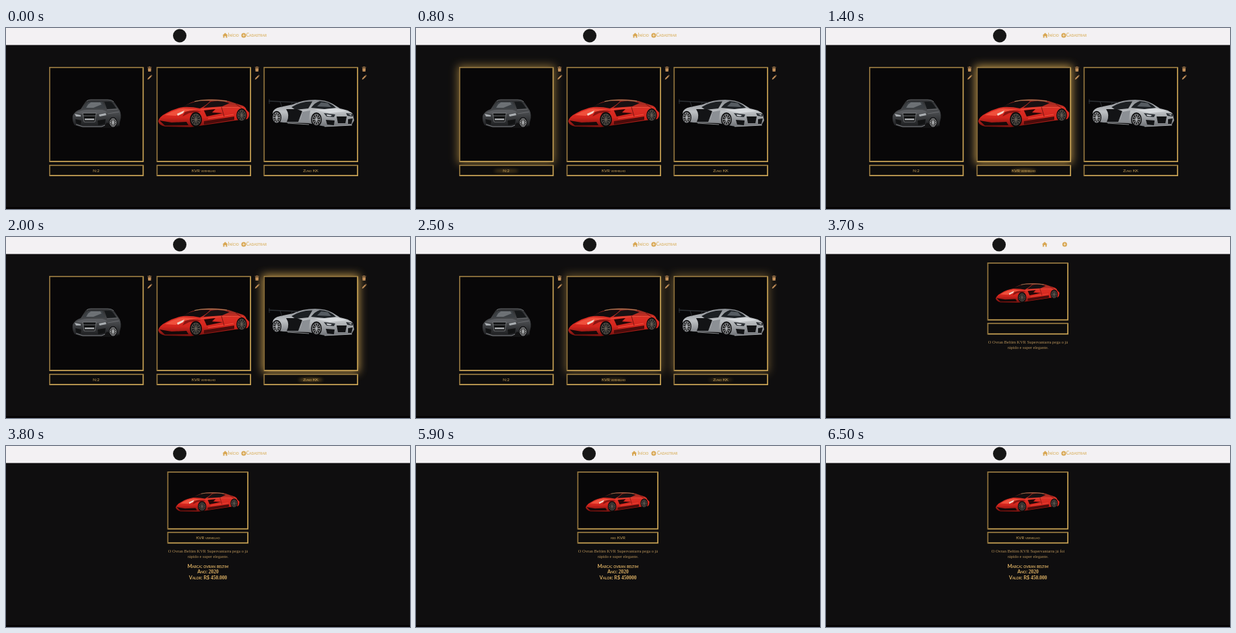
Animation of 600x270 px, one loop 7.7 s. Source, as an HTML page:

```html
<!DOCTYPE html>
<html lang="pt">
<head>
<meta charset="utf-8">
<title>Carros</title>
<style>
  html, body { margin: 0; width: 100%; height: 100%; overflow: hidden; background: #0f0e0f; }
  svg { display: block; width: 600px; height: 270px; }
  .caps { font-family: Lato, sans-serif; font-variant: small-caps; fill: #d0a85e; }
  .mid { text-anchor: middle; }
  .title { font-size: 6.2px; }
  .nav { font-size: 6.5px; font-weight: 700; fill: #dcb870; }
  .desc { font: 6.4px "Liberation Serif", serif; fill: #b8935a; }
  .spec { font-size: 7.2px; font-weight: 700; fill: #dcb064; }
  .num { font: 700 7.5px "Liberation Serif", serif; }
</style>
</head>
<body>
<svg id="stage" viewBox="0 0 600 270">
  <defs>
    <filter id="blur" x="-30%" y="-30%" width="160%" height="160%"><feGaussianBlur stdDeviation="6.5"/></filter>
    <filter id="soft" x="-50%" y="-100%" width="200%" height="300%"><feGaussianBlur stdDeviation="2"/></filter>
    <linearGradient id="red" x1="0" y1="0" x2="0" y2="1">
      <stop offset="0" stop-color="#7d2a20"/><stop offset=".35" stop-color="#dc2f25"/>
      <stop offset=".65" stop-color="#d3251d"/><stop offset="1" stop-color="#6e100e"/>
    </linearGradient>
    <linearGradient id="silver" x1="0" y1="0" x2="0" y2="1">
      <stop offset="0" stop-color="#85898e"/><stop offset=".45" stop-color="#bfc2c5"/><stop offset="1" stop-color="#707378"/>
    </linearGradient>
    <linearGradient id="grey" x1="0" y1="0" x2="0" y2="1">
      <stop offset="0" stop-color="#2b2c2e"/><stop offset=".45" stop-color="#4b4d50"/><stop offset="1" stop-color="#1b1c1e"/>
    </linearGradient>
  </defs>
  <rect width="600" height="270" fill="#0f0e0f"/>
  <rect y="267" width="600" height="3" fill="#060405"/>
  <rect width="600" height="25.4" fill="#f3f1f3"/>
  <g id="nav"></g>
  <g id="list"></g>
  <g id="detail"></g>
</svg>
<script>
const LOOP = 7700;
const $ = id => document.getElementById(id);
const path = (fill, d) => `<path fill="${fill}" d="${d}"/>`;
const line = (color, width, d) => `<path fill="none" stroke="${color}" stroke-width="${width}" d="${d}"/>`;
const text = (cls, x, y, s) => `<text class="${cls}" x="${x}" y="${y}">${s}</text>`;
const num = s => `<tspan class="num">${s}</tspan>`;

// Inset gold border
function frame(x, y, w, h, fill) {
  const b = 1.7;
  return `<rect x="${x}" y="${y}" width="${w}" height="${h}" fill="${fill}"/>` +
    path('#93763f', `M${x} ${y + h}V${y}H${x + w}l${-b} ${b}H${x + b}V${y + h - b}z`) +
    path('#c9a355', `M${x} ${y + h}H${x + w}V${y}l${-b} ${b}V${y + h - b}H${x + b}z`);
}

function wheel(x, y, rx, ry, rim) {
  let spokes = '';
  for (let i = 0; i < 10; i++) {
    const a = i * Math.PI / 5;
    spokes += `M${x} ${y}l${(rx * .7 * Math.cos(a)).toFixed(2)} ${(ry * .7 * Math.sin(a)).toFixed(2)}`;
  }
  return `<ellipse cx="${x}" cy="${y}" rx="${rx}" ry="${ry}" fill="#0b0b0c"/>` +
    `<ellipse cx="${x}" cy="${y}" rx="${rx * .76}" ry="${ry * .76}" fill="#222" stroke="${rim}" stroke-width=".8"/>` +
    line(rim, .9, spokes);
}

const suv =
  path('#131314', 'M101 144L112 149H160L169 146V138H100z') +
  path('url(#grey)', 'M99 131Q102 124 111 121L118 110Q120 107 125 107H151Q158 107 161 111L167 120Q171 125 170.5 134L168 145L160 147L150 141L144 148H113L102 145Q98 139 99 131z') +
  path('#3c4044', 'M114 120L120 112Q122 110 126 110H143L147 120z') +
  path('#6d7175', 'M122 114L126 111H140L142 114L130 119H119z') +
  path('#17191b', 'M146 110H153Q157 110 159 113L164 120L150 121z') +
  line('#85888b', .7, 'M120 109Q122 107 126 107H151Q157 107 160 110') +
  path('#5a5c60', 'M104 127Q112 122 121 122H143Q148 123 150 126L137 128H113z') +
  path('#121314', 'M114 127H134L132 140H116z') +
  line('#8d9093', .7, 'M114 127H134L132 140H116zM115 131H133') +
  path('#a9adb1', 'M102 128L111 130V132L104 132zM138 129L148 127L149 130L139 132z') +
  path('#a9abae', 'M117 135H131V137.5H117z') +
  path('#121314', 'M103 136L112 138L111 144L104 142zM136 138L148 136L147 143L137 145z') +
  line('#9b9da1', .8, 'M104 144L114 147H142L147 145') +
  line('#77797d', .7, 'M151 128L168 125M150 122L166 121') +
  wheel(159, 141, 6, 8, '#b9bbbe');

const redCar =
  path('#060606', 'M228 146L274 150L345 140L361 133L355 126L282 128z') +
  path('url(#red)', 'M226 139Q228 132 238 127Q250 120 263 118Q275 109 291 107Q314 105 331 109L352 116Q356 118 357 122L361 126Q362 133 358 136L340 138L294 145L274 148L236 147Q227 145 226 139z') +
  path('#120d0e', 'M261 118Q275 110 290 108.5L303 109Q297 116 288 120Q276 117 261 118z') +
  path('#171113', 'M293 119L304 110Q319 107 332 112L321 117z') +
  line('#a78a5f', 1, 'M280 109.5Q298 105.5 328 109') +
  path('#f0503c', 'M236 130Q249 122 263 120L285 122Q267 123 252 131z') +
  path('#8a1512', 'M266 125Q280 121 290 125L272 127L262 132z') +
  path('#f0d8cc', 'M254 128L265 123L263 127L255 131z') +
  path('#160909', 'M228 138L246 141L268 140L271 145L236 145.5z') +
  path('#230808', 'M294 123L311 121L306 126L322 127L298 132z') +
  path('#4c0c0b', 'M294 139L339 132V137L294 144z') +
  line('#f2523f', 1, 'M289 122Q318 117 352 119M300 135L338 129') +
  line('#5e0e0c', .8, 'M320 118L324 132M341 113L355 123') +
  wheel(282, 136.5, 9, 11, '#6d6259') +
  wheel(350, 130, 7.8, 10, '#6d6259');

const silverCar =
  path('#060607', 'M397 142L405 146L470 149L515 146V138H398z') +
  path('url(#silver)', 'M396 127Q397 120 407 118L426 114Q440 107 459 107Q475 107 485 113L496 120Q511 123 515 128L517 138L513 145L474 147L449 142L412 141L397 139z') +
  path('#1c2024', 'M453 119Q459 111 466 109Q480 109 490 119L473 121z') +
  path('#555b61', 'M462 117L468 111L478 112L483 118z') +
  path('#1d2023', 'M424 118Q438 109 455 109.5L449 120L430 122z') +
  path('#131416', 'M416 121L432 121L440 124L434 140L417 140Q422 130 416 121z') +
  path('#d6d9dc', 'M458 122L492 120L507 124L481 127z') +
  path('#8c9095', 'M440 125L452 123L449 140L437 139z') +
  path('#2b2f34', 'M472 127L489 129L487 133L476 132zM505 127L515 128V132L507 131z') +
  path('#e4e7ea', 'M476 129L484 130L482 131.5L477 131zM508 128.5L513 129V130.5z') +
  path('#121315', 'M491 132H506L504 142H493zM475 137L488 138L487 145L477 144zM508 136L515 135L513 143L508 143z') +
  line('#b9bcbf', .8, 'M473 147L514 145M418 142L450 144') +
  line('#2d3135', 1.5, 'M390 109L434 111') +
  line('#2d3135', 1, 'M391 106V113M407 110L410 118M425 111L424 115') +
  wheel(402, 133.5, 7, 9.8, '#b9bcbf') +
  wheel(461, 136.5, 8, 10.5, '#b9bcbf');

const tools = x =>
  path('#bf8d58', `M${x - 3} 58.2h2l.4-.8h1.2l.4.8h2v.9h-6zM${x - 2.5} 59.8h5l-.4 5.2h-4.2z`) +
  path('#bf8d58', `M${x - 3} 77l.6-2.2 4-4 1.5 1.5-4 4zM${x + 2} 70.3l.6-.6 1.5 1.5-.6.6z`);

const cards = [
  [64, suv, 'N:2'],
  [223.5, redCar, 'KVR vermelho'],
  [382.5, silverCar, 'Zuno KK']
];

$('list').innerHTML = cards.map(([x, car, name]) => `
  <rect class="glow" x="${x - 2}" y="56" width="144" height="146" fill="#c39a4c" filter="url(#blur)"/>
  ${frame(x, 58, 140.5, 142, '#080708')}${car}
  ${frame(x, 204, 140.5, 17, '#0d0c0c')}
  <ellipse class="shade" cx="${x + 70}" cy="213" rx="18" ry="2.5" fill="#8a6a2c" filter="url(#soft)"/>
  ${text('caps mid title', x + 70, 214.7, name)}${tools(x + 149.2)}`).join('');

function drawNav(mode) {
  const wide = mode !== 'normal';
  const home = mode === 'wide' ? 324 : 325.5 - (mode === 'bare' ? .7 : 0);
  const plus = mode === 'bare' ? 354.5 : 353;
  $('nav').innerHTML =
    `<circle cx="${wide ? 257 : 258}" cy="11.5" r="10" fill="#161616"/>` +
    path('#d8a754', `M${home - 4} 11l4-3.7 4 3.7h-1v3.5h-2v-2.5h-2v2.5h-2v-3.5z`) +
    `<circle cx="${plus}" cy="11" r="3.5" fill="#d8a754"/>` +
    line('#f8eeda', .9, `M${plus - 1.8} 11h3.6M${plus} 9.2v3.6`) +
    (mode === 'bare' ? '' :
      text('caps nav', wide ? 329.2 : 329.6, 13.2, 'Início') +
      text('caps nav', wide ? 358 : 356.7, 13.2, 'Cadastrar'));
}

function drawDetail({ name, verb, price }) {
  const specs = name ? [
    'Marca: ovran beltim', 'Ano: ' + num('2020'), 'Valor: R$ ' + num(price)
  ].map((s, i) => text('caps mid spec', 300, 181.7 + i * 8.5, s)).join('') : '';
  $('detail').innerHTML =
    frame(239.5, 38, 120.5, 86.5, '#080708') +
    `<g transform="translate(93.8 -5.5) scale(.7)">${redCar}</g>` +
    frame(239.5, 128, 120.5, 17.5, '#0d0c0c') +
    text('caps mid title', 300, 138.8, name) +
    text('desc mid', 300, 159, `O Ovran Beltim KVR Supervantarra ${verb}`) +
    text('desc mid', 300, 166.8, 'rápido e super elegante.') + specs;
}

const blank = { name: '', verb: 'pega o já' };
const first = { name: 'KVR vermelho', verb: 'pega o já', price: '450.000' };
const edited = { name: 'red KVR', verb: 'pega o já', price: '450000' };
const last = { name: 'KVR vermelho', verb: 'já foi', price: '450.000' };

// [start ms, header, glow per card or detail content]
const steps = [
  [0, 'normal', [0, 0, 0]],
  [700, 'normal', [.35, 0, 0]],
  [800, 'normal', [.7, 0, 0]],
  [900, 'normal', [1, 0, 0]],
  [1400, 'normal', [0, 1, 0]],
  [2000, 'normal', [0, 0, 1]],
  [2500, 'normal', [0, .5, .5]],
  [2600, 'normal', [0, 1, 0]],
  [3700, 'bare', blank],
  [3800, 'normal', first],
  [5900, 'wide', edited],
  [6000, 'normal', edited],
  [6400, 'wide', last],
  [6500, 'normal', last]
];

const glows = document.querySelectorAll('.glow');
const shades = document.querySelectorAll('.shade');
let shown;

function show(step) {
  const [, mode, view] = step;
  const isList = Array.isArray(view);
  drawNav(mode);
  $('list').style.display = isList ? '' : 'none';
  $('detail').style.display = isList ? 'none' : '';
  if (isList) {
    view.forEach((v, i) => {
      glows[i].style.opacity = v * .9;
      shades[i].style.opacity = v * .7;
    });
  } else {
    drawDetail(view);
  }
}

const start = performance.now();
function tick() {
  const t = (performance.now() - start) % LOOP;
  const step = steps.findLast(s => s[0] <= t);
  if (step !== shown) show(shown = step);
  requestAnimationFrame(tick);
}
tick();
</script>
</body>
</html>
```
